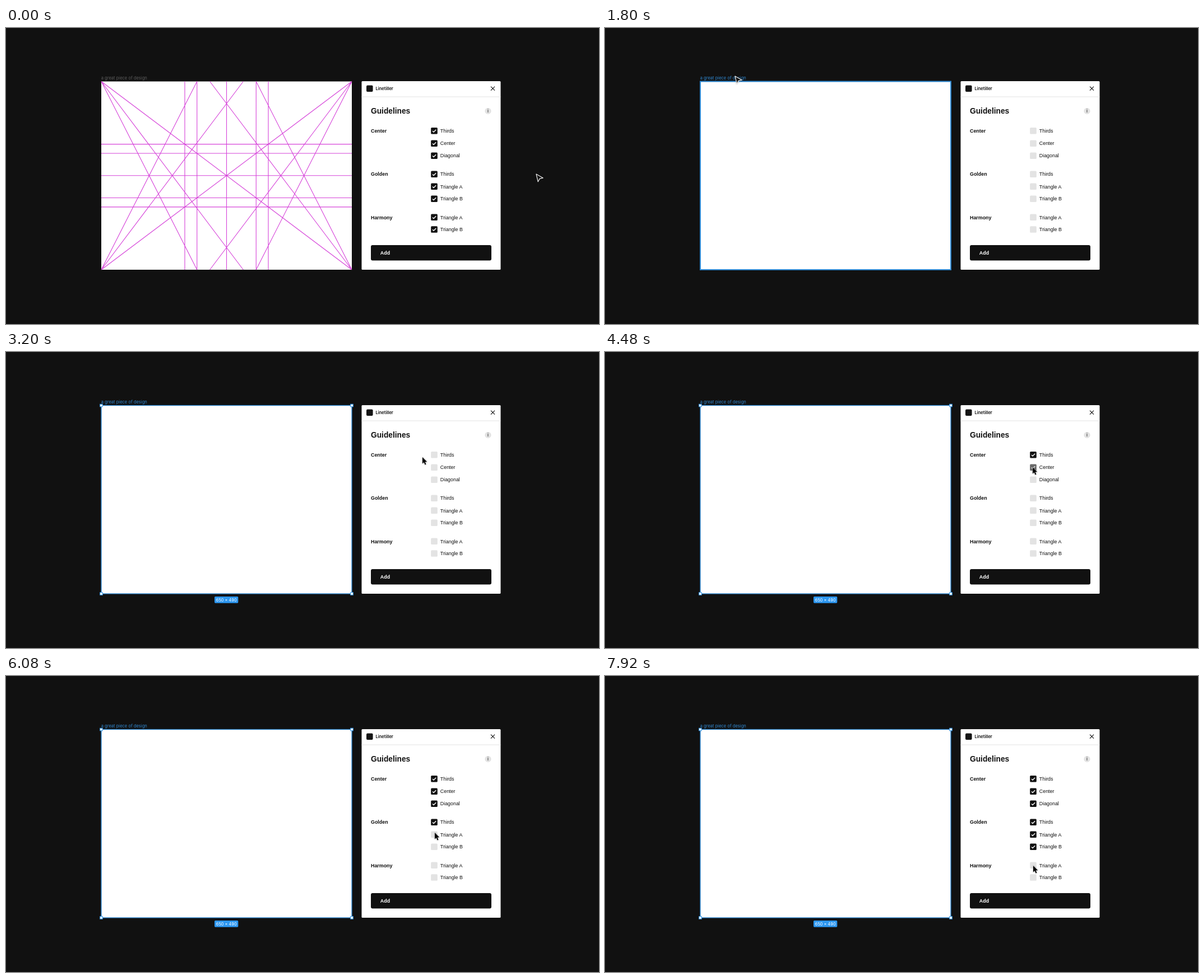
These frames come from a looping animation (1058x529 px, 8 s). An HTML page:

```html
<!DOCTYPE html>
<html lang="en">
<head>
<meta charset="utf-8">
<title>Guidelines panel</title>
<style>
  html, body { margin: 0; width: 100%; height: 100%; overflow: hidden; background: #111; }
  svg { display: block; width: 100%; height: 100%; }
  text { font: 8.9px "Liberation Sans", Arial, sans-serif; fill: #111; }
  .bold { font-weight: 700; }
  .heading { font-size: 13.74px; font-weight: 700; }
  .ui { font-family: Inter, sans-serif; font-size: 7.56px; }
</style>
</head>
<body>
<svg viewBox="0 0 1058 529">
  <rect width="1058" height="529" fill="#111"/>
  <text id="label" class="ui" x="169.7" y="92">a great piece of design</text>
  <rect id="frame" x="170" y="95.5" width="447" height="336.5" fill="#fff"/>
  <path id="guides" fill="none" stroke="#d643d9" stroke-width="1.1"/>
  <g id="selection" fill="#fff" stroke="#2c92e6">
    <g id="handles"></g>
    <rect x="372" y="437" width="42.3" height="11.7" rx="1.6" fill="#2c96f0" stroke="none"/>
    <text class="ui" x="393.2" y="445.6" text-anchor="middle" stroke="none" style="fill:#fff;font-size:7.4px">650 × 490</text>
  </g>

  <rect x="634.5" y="95" width="248" height="337" rx="1.5" fill="#fff"/>
  <path d="M634.5 123H882.5" stroke="#e3e3e3"/>
  <rect x="643" y="102.4" width="11.6" height="11.6" rx="2" fill="#151515"/>
  <text class="ui" x="659.5" y="111" style="font-weight:600">Linetiller</text>
  <path d="M865 104.6l7 7m0 -7l-7 7" stroke="#111" stroke-width="1.1"/>
  <text class="heading" x="651" y="153.4">Guidelines</text>
  <circle cx="860" cy="148.4" r="5.6" fill="#e2e2e2"/>
  <text x="860" y="151.4" text-anchor="middle" style="font-size:8.6px">i</text>
  <g id="options"></g>
  <rect x="651" y="388" width="215" height="27.5" rx="3" fill="#111"/>
  <text class="bold" x="667.8" y="404.5" style="fill:#fff">Add</text>

  <g id="cursor" style="filter:drop-shadow(0 .8px .8px rgba(0,0,0,.35))">
    <path id="canvasArrow" d="M0 0L12.2 6.9L6.2 8.4L3.2 13.8Z" fill="#161616" stroke="#eee" stroke-width="1.2" stroke-linejoin="round"/>
    <path id="panelArrow" d="M0 0V11.6L2.7 9.1L4.6 13.5L6.5 12.7L4.6 8.4L8.2 8.2Z" fill="#000" stroke="#fff" stroke-width=".8" stroke-linejoin="round" paint-order="stroke"/>
  </g>
</svg>
<script>
const $ = id => document.getElementById(id);
const LOOP = 8000;
const FADE = 140;
const box = { left: 170, top: 95.5, right: 617, bottom: 432 };
const boxWidth = box.right - box.left, boxHeight = box.bottom - box.top;

// Guide lines in coordinates relative to the frame, 0 to 1
function guidePath() {
  const lines = [];
  for (const p of [1 / 3, 0.382, 0.5, 0.618, 2 / 3]) lines.push([p, 0, p, 1], [0, p, 1, p]);
  lines.push([0, 0, 1, 1], [0, 1, 1, 0]);
  const perpendicular = (boxHeight / boxWidth) ** 2;
  for (const reach of [0.382, perpendicular])
    for (const y of [0, 1]) lines.push([0, y, reach, 1 - y], [1, y, 1 - reach, 1 - y]);
  const point = (x, y) => `${box.left + x * boxWidth} ${box.top + y * boxHeight}`;
  return lines.map(([a, b, c, d]) => `M${point(a, b)}L${point(c, d)}`).join("");
}
$("guides").setAttribute("d", guidePath());

$("handles").innerHTML = [box.left, box.right].flatMap(x => [box.top, box.bottom].map(y =>
  `<rect x="${x - 2.3}" y="${y - 2.3}" width="4.6" height="4.6"/>`)).join("");

// [label, y, time of the click, group title]
const options = [
  ["Thirds", 183.8, 3600, "Center"],
  ["Center", 206.2, 4400],
  ["Diagonal", 228.2, 4960],
  ["Thirds", 261.2, 5720, "Golden"],
  ["Triangle A", 283.3, 6240],
  ["Triangle B", 305.2, 7280],
  ["Triangle A", 338.3, Infinity, "Harmony"],
  ["Triangle B", 360, Infinity],
];
$("options").innerHTML = options.map(([label, y, , group]) => `
  ${group ? `<text class="bold" x="651" y="${y + 3.2}">${group}</text>` : ""}
  <text x="774.8" y="${y + 3.2}">${label}</text>
  <g transform="translate(764 ${y})">
    <rect x="-5.8" y="-5.7" width="11.6" height="11.4" rx="1.5" fill="#e3e3e3"/>
    <g class="tick">
      <rect x="-5.8" y="-5.7" width="11.6" height="11.4" rx="1.5" fill="#111"/>
      <path d="M-3 .3L-1 2.3L3.2 -2" fill="none" stroke="#fff" stroke-width="1.4"/>
    </g>
  </g>`).join("");
const ticks = document.querySelectorAll(".tick");

// Pointer stops: [time, x, y]
const stops = [
  [0, 946, 261], [999, 946, 261], [1000, 944, 258.5], [1800, 232, 86],
  [2040, 229, 87], [2600, 227, 87], [3200, 743, 188], [3520, 764, 183.5],
  [3920, 764, 184], [4320, 763, 206], [4500, 763, 206], [4800, 763, 228],
  [5120, 763, 228], [5680, 764, 259], [5800, 764, 260], [6080, 765, 280],
  [6400, 765, 281], [6720, 764, 301], [6800, 764, 301], [6960, 764, 303],
  [7400, 764, 303], [7760, 764, 339], [LOOP, 764, 339],
];

function pointerAt(t) {
  const i = Math.max(1, stops.findIndex(stop => stop[0] > t));
  const [t0, x0, y0] = stops[i - 1], [t1, x1, y1] = stops[i];
  const p = (t - t0) / (t1 - t0);
  const eased = p * p * (3 - 2 * p);
  return [x0 + (x1 - x0) * eased, y0 + (y1 - y0) * eased];
}

// The picture advances in 80 ms steps after an opening hold
function snap(t) {
  if (t < 1000) return 0;
  const offset = t < 2280 ? 40 : 0;
  return Math.floor((t - offset) / 80) * 80 + offset;
}

const show = (id, visible) => $(id).style.display = visible ? "" : "none";

function draw(t) {
  const [x, y] = pointerAt(t);
  const opening = t < 1000;
  const selected = t >= 2160;
  const hovered = !opening && x < box.right;
  const overPanel = x > 634 && x < 882 && y > 95 && y < 432;

  show("guides", opening);
  show("selection", selected);
  $("label").style.fill = selected || hovered ? "#2f87cf" : "#5c5c5c";
  $("frame").setAttribute("stroke", selected || hovered ? "#2c86cf" : "none");
  $("frame").setAttribute("stroke-width", selected ? 1.3 : 2);
  ticks.forEach((tick, i) => {
    tick.style.opacity = opening ? 1 : Math.min(1, Math.max(0, (t - options[i][2]) / FADE));
  });

  $("cursor").setAttribute("transform", `translate(${x} ${y})`);
  show("canvasArrow", !overPanel);
  show("panelArrow", overPanel);
}

const start = performance.now();
function tick() {
  draw(snap(Math.max(0, performance.now() - start) % LOOP));
  requestAnimationFrame(tick);
}
tick();
</script>
</body>
</html>
```
